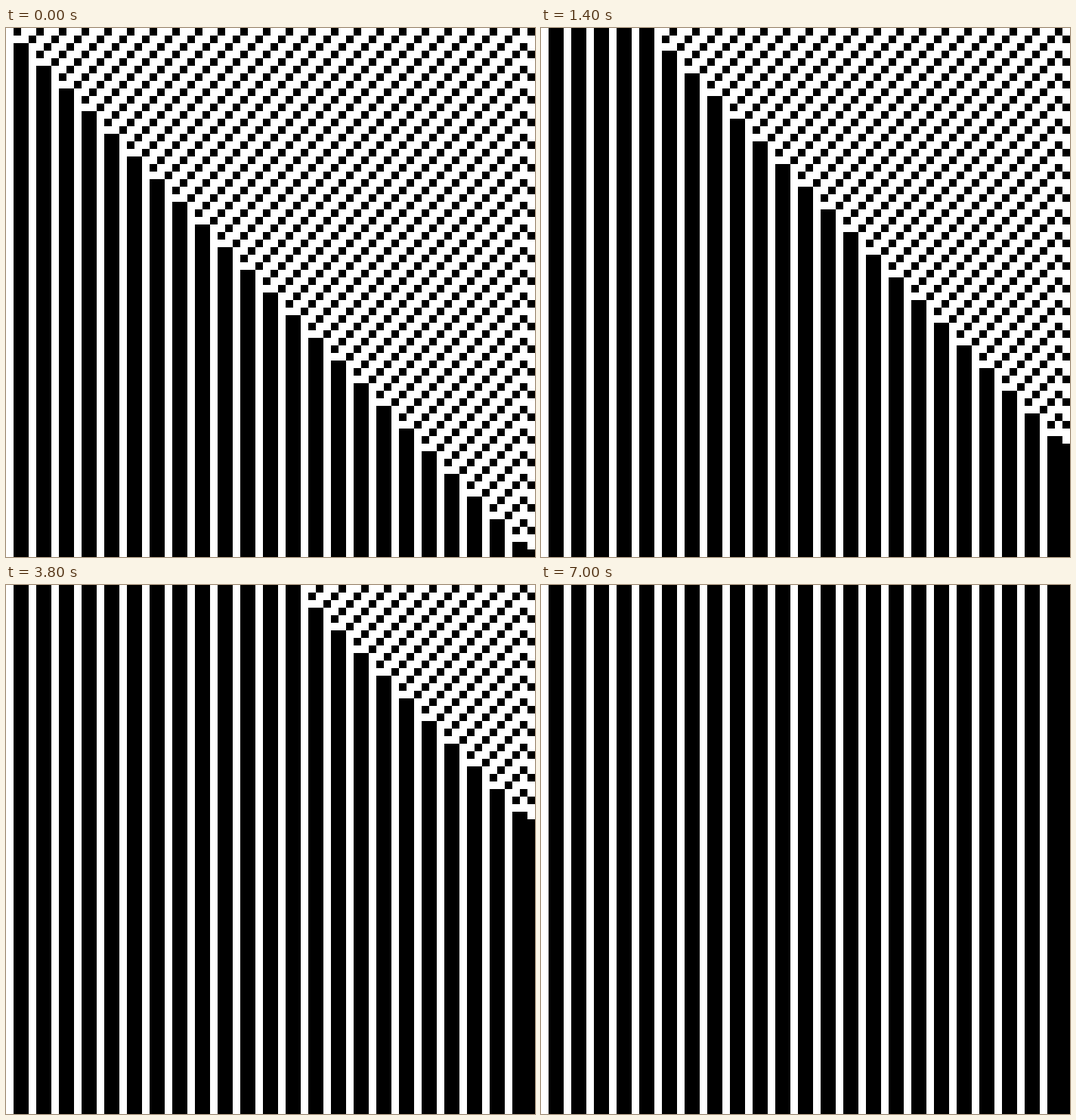
An HTML page with a canvas for the animation above (8 s loop, 700 by 700 pixels).

```html
<!DOCTYPE html>
<html>
<head>
<meta charset="utf-8">
<style>
  html, body { margin: 0; width: 100%; height: 100%; overflow: hidden; background: #fff; }
  canvas { display: block; }
</style>
</head>
<body>
<canvas width="700" height="700"></canvas>
<script>
const SIZE = 70, CELL = 10, RULE = 203;
const STEP = 200, LOOP = 8000, LAST = 35;
const ctx = document.querySelector('canvas').getContext('2d');

// Elementary cellular automaton: left edge stays white, right edge copies its neighbour.
const evolve = row => row.map((c, x) =>
  x === 0 ? 0 :
  x === SIZE - 1 ? row[x - 1] :
  RULE >> (4 * row[x - 1] + 2 * c + row[x + 1]) & 1);

const rows = [Array.from({ length: SIZE }, (_, x) => +(x % 3 === 1 || x === SIZE - 1))];
while (rows.length < SIZE + 2 * LAST) rows.push(evolve(rows[rows.length - 1]));

function draw(top) {
  ctx.fillStyle = '#fff';
  ctx.fillRect(0, 0, 700, 700);
  ctx.fillStyle = '#000';
  for (let y = 0; y < SIZE; y++)
    rows[top + y].forEach((c, x) => c && ctx.fillRect(x * CELL, y * CELL, CELL, CELL));
}

function frame() {
  const step = Math.floor(performance.now() % LOOP / STEP);
  draw(2 * Math.min(step, LAST));
  requestAnimationFrame(frame);
}
frame();
</script>
</body>
</html>
```
